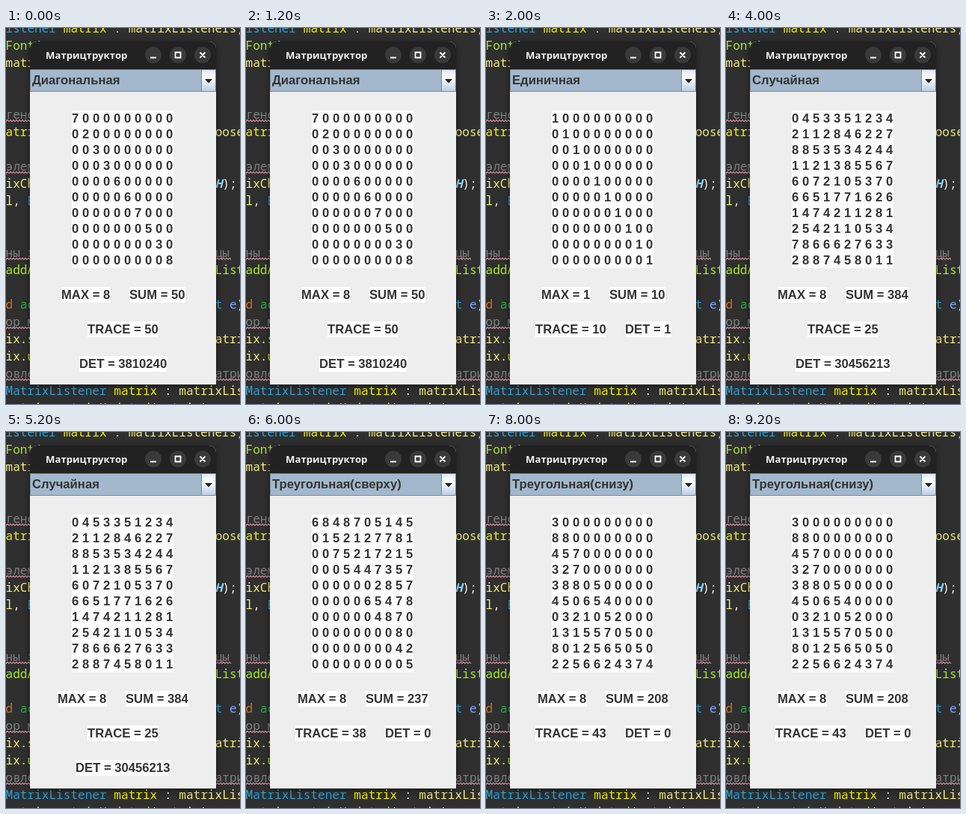
Animation, 313 px wide and 501 px high, one loop 10 s. Source, as an HTML page:

```html
<!DOCTYPE html>
<html lang="ru">
<head>
<meta charset="utf-8">
<style>
  html, body { margin: 0; width: 100%; height: 100%; overflow: hidden; background: #2f2f2f; }
  svg { display: block; }
  text { white-space: pre; font-kerning: none; }
  .code { font: 16.1px "Noto Sans Mono", monospace; }
  .code .constant { font-style: italic; font-weight: bold; }
  .ui { font: bold 16.67px "Liberation Sans", Arial, sans-serif; fill: #333; }
  .title { font: 600 13.2px "Noto Sans", sans-serif; fill: #f4f4f4; }
</style>
</head>
<body>
<svg id="stage" width="313" height="501" viewBox="0 0 313 501">
  <defs>
    <clipPath id="frame"><path d="M32 475V27a9 9 0 0 1 9-9H272a9 9 0 0 1 9 9V475Z"/></clipPath>
    <linearGradient id="button" x2="0" y2="1">
      <stop offset="0" stop-color="#dde8f3"/>
      <stop offset=".35" stop-color="#fff"/>
      <stop offset="1" stop-color="#b8cfe5"/>
    </linearGradient>
  </defs>
  <rect width="313" height="501" fill="#2f2f2f"/>
  <g id="editor" class="code"></g>
  <g style="filter:drop-shadow(0 2px 4px rgba(0,0,0,.5))">
    <g clip-path="url(#frame)">
      <rect x="32" y="18" width="249" height="457" fill="#eee"/>
      <rect x="32" y="18" width="249" height="37" fill="#222"/>
      <text class="title" x="53" y="41">Матрицтруктор</text>
      <g fill="#3a3a3a">
        <circle cx="197" cy="36" r="11"/><circle cx="230" cy="36" r="11"/><circle cx="263" cy="36" r="11"/>
      </g>
      <path d="M193 39.5h8M226.5 32.5h7v7h-7ZM259.5 32.5l7 7m0-7l-7 7" fill="none" stroke="#fff" stroke-width="1.8"/>
      <rect x="32.5" y="55.5" width="248" height="29" fill="#a3b8cc" stroke="#7a8a99"/>
      <rect x="261.5" y="55.5" width="19" height="29" fill="url(#button)" stroke="#7a8a99"/>
      <path d="M266 68h10l-5 5.5Z" fill="#222"/>
      <text id="choice" class="ui" x="35" y="75"></text>
      <rect x="88" y="110" width="136" height="210" fill="#fff"/>
      <g id="matrix" class="ui"></g>
      <g id="labels" class="ui"></g>
    </g>
  </g>
</svg>
<script>
const SIZE = 10, STEP = 2000, CENTER = 156.5, GAP = 25;
const LINE = 23, COLUMN = 9.66;
const byId = id => document.getElementById(id);

function add(parent, tag, attrs, text = '') {
  const el = document.createElementNS('http://www.w3.org/2000/svg', tag);
  for (const key in attrs) el.setAttribute(key, attrs[key]);
  el.textContent = text;
  parent.append(el);
  return el;
}

// Editor behind the window
const color = {
  plain: '#f0f0f0', type: '#2f9fd6', local: '#f2f200', use: '#f3ec79',
  call: '#a7ec21', method: '#1eb540', param: '#79abff',
  keyword: '#cc6c1d', comment: '#808080', constant: '#8ddaf8'
};

function code(row, col, ...parts) {
  const line = add(byId('editor'), 'text', { x: col * COLUMN - 0.5, y: row * LINE + 6 });
  for (const [kind, text] of parts) add(line, 'tspan', { fill: color[kind], class: kind }, text);
}

function squiggle(row, from, to) {
  let d = `M${from} ${row * LINE + 9.5}`;
  for (let x = from; x < to; x += 4) d += 'l2 -2l2 2';
  add(byId('editor'), 'path', { d, fill: 'none', stroke: '#d08a9a', 'stroke-width': 1.1 });
}

code(0, 0, ['type', 'istener '], ['local', 'matrix'], ['plain', ' : '], ['use', 'matrixListeners'], ['plain', ')']);
code(1, 0, ['call', 'Font'], ['plain', '(']);
code(2, 0, ['use', 'matrix']);
code(5, 0, ['comment', 'генер']);
code(6, 0, ['local', 'atrix']);
code(6, 29, ['use', 'oose']);
code(8, 0, ['comment', 'элемен']);
code(9, 0, ['use', 'ixCho']);
code(9, 29, ['constant', 'H'], ['plain', ');']);
code(10, 0, ['use', 'l'], ['plain', ', '], ['type', 'B']);
code(13, 0, ['comment', 'ны з']);
code(13, 29, ['comment', 'цы']);
code(14, 0, ['call', 'addAc']);
code(14, 29, ['call', 'List']);
code(16, 0, ['keyword', 'd '], ['method', 'act']);
code(16, 29, ['type', 't '], ['param', 'e'], ['plain', ')']);
code(17, 0, ['comment', 'ор м']);
code(18, 0, ['use', 'ix'], ['plain', '.'], ['call', 'set']);
code(18, 29, ['use', 'atri']);
code(19, 0, ['use', 'ix'], ['plain', '.'], ['call', 'upd']);
code(20, 0, ['comment', 'овлен']);
code(20, 29, ['comment', 'атри']);
code(21, 0, ['type', 'MatrixListener '], ['local', 'matrix'], ['plain', ' : '], ['use', 'matrixLis']);
code(22, 0, ['use', 'matrix'], ['plain', '.'], ['call', 'matrixUpdated'], ['plain', '('], ['use', 'matrix'], ['plain', ');']);
for (const row of [5, 8, 13, 17, 20]) squiggle(row, 0, 32);
squiggle(13, 281, 299);
squiggle(20, 281, 313);

// Matrices
const diagonal = digits => [...digits].map((d, i) => d.padStart(i + 1, '0').padEnd(SIZE, '0'));
const upper = text => text.split(' ').map(row => row.padStart(SIZE, '0'));
const lower = text => text.split(' ').map(row => row.padEnd(SIZE, '0'));

const scenes = [
  { name: 'Диагональная', det: 3810240, rows: diagonal('7233667538') },
  { name: 'Единичная', det: 1, rows: diagonal('1'.repeat(SIZE)) },
  { name: 'Случайная', det: 30456213, rows: upper(
    '0453351234 2112846227 8853534244 1121385567 6072105370 ' +
    '6651771626 1474211281 2542110534 7866627633 2887458011') },
  { name: 'Треугольная(сверху)', det: 0, rows: upper(
    '6848705145 152127781 75217215 5447357 2857 65478 4870 80 42 5') },
  { name: 'Треугольная(снизу)', det: 0, rows: lower(
    '3 88 457 327 38805 450654 0321052 13155705 801256505 2256624374') }
];

const xs = Array.from({ length: SIZE }, (_, i) => 88 + 14 * i).join(' ');
const lines = Array.from({ length: SIZE }, (_, i) => add(byId('matrix'), 'text', { x: xs, y: 126 + 21 * i }));

const labels = Array.from({ length: 4 }, () => ({
  box: add(byId('labels'), 'rect', { height: 21, fill: '#fff' }),
  text: add(byId('labels'), 'text', {})
}));

function placeRow(items, top) {
  const total = items.reduce((sum, item) => sum + item.width, GAP * (items.length - 1));
  let x = Math.floor(CENTER - total / 2 + 0.5);
  for (const { box, text, width } of items) {
    box.setAttribute('x', x);
    box.setAttribute('y', top);
    box.setAttribute('width', width);
    text.setAttribute('x', x);
    text.setAttribute('y', top + 16);
    x += width + GAP;
  }
}

function show({ name, det, rows }) {
  byId('choice').textContent = name;
  rows.forEach((row, i) => { lines[i].textContent = row; });

  const cells = [...rows.join('')].map(Number);
  const total = list => list.reduce((a, b) => a + b, 0);
  const values = {
    MAX: Math.max(...cells), SUM: total(cells),
    TRACE: total(rows.map((row, i) => +row[i])), DET: det
  };
  Object.entries(values).forEach(([key, value], i) => {
    labels[i].text.textContent = `${key} = ${value}`;
    labels[i].width = Math.round(labels[i].text.getComputedTextLength() + 0.3);
  });

  const [max, sum, trace, last] = labels;
  placeRow([max, sum], 345);
  if (trace.width + GAP + last.width <= 199) {
    placeRow([trace, last], 391);
  } else {
    placeRow([trace], 391);
    placeRow([last], 437);
  }
}

const start = performance.now();
let current = -1;

function tick() {
  const index = Math.floor((performance.now() - start) / STEP) % scenes.length;
  if (index !== current) show(scenes[current = index]);
  requestAnimationFrame(tick);
}
tick();
</script>
</body>
</html>
```
